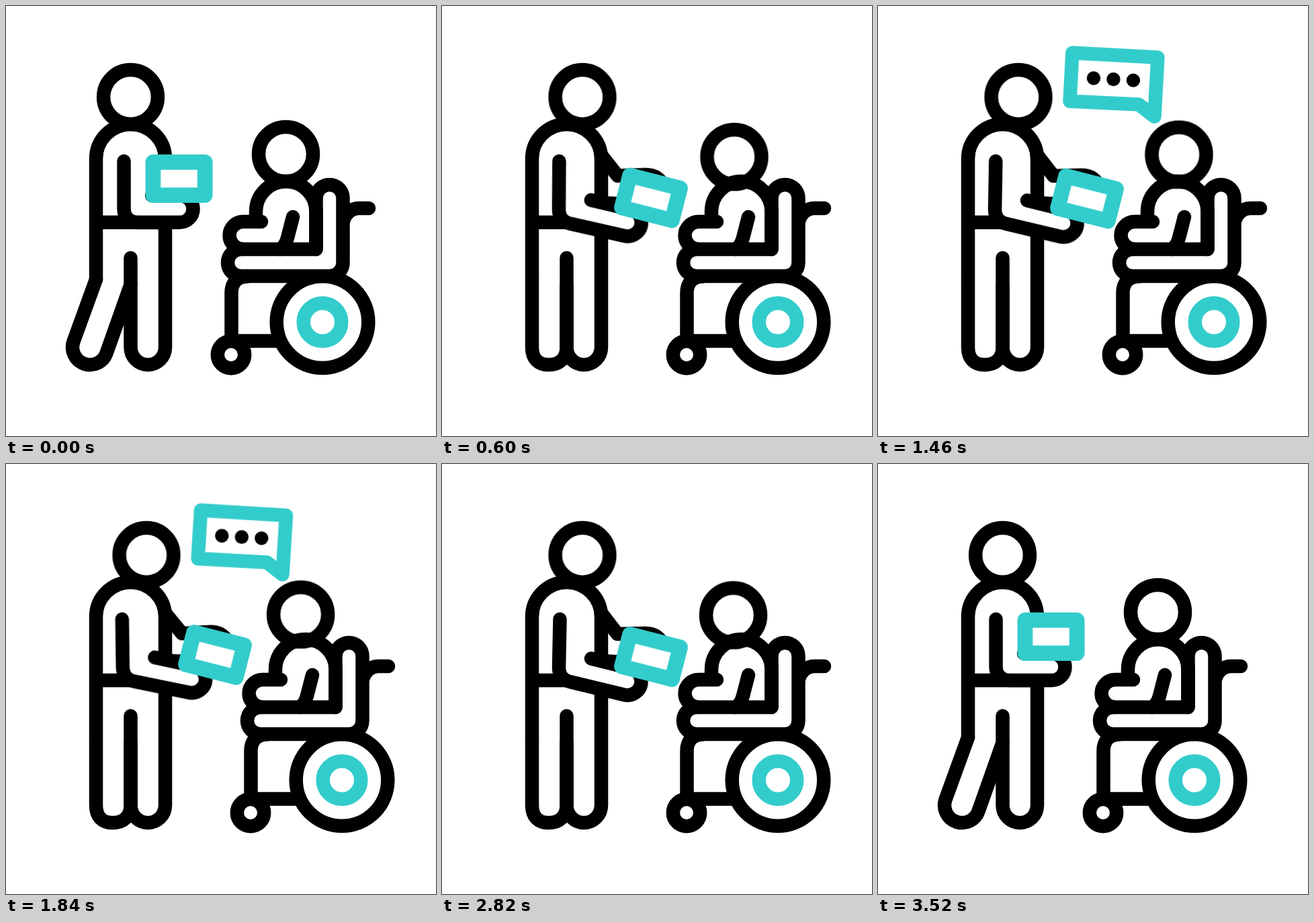
These frames come from a looping animation (640 by 640 pixels, 3600 ms). An HTML page:

```html
<!DOCTYPE html>
<html lang="en">
<head>
<meta charset="utf-8">
<title>Handing over a parcel</title>
<style>
html, body { margin: 0; width: 100%; height: 100%; overflow: hidden; background: #fff; }
svg { display: block; width: 100vw; height: 100vh; }
path, circle, rect { fill: none; stroke: #000; stroke-width: 20.5; stroke-linecap: round; stroke-linejoin: round; }
.teal { stroke: #33cccc; }
.solid { fill: #fff; }
.move { animation: 3600ms ease-in-out infinite; }

#helper-head { animation-name: lean; }
#back-leg { animation-name: step; }
#far-arm { animation-name: reach-far; }
#near-arm { animation-name: reach-near; }
#far-bob { animation-name: bob; transform-origin: 240px 225px; }
#near-bob { animation-name: bob; transform-origin: 175px 308px; }
#box-bob { animation-name: lift; }
#box { animation-name: hand-over; }
#chair { animation-name: roll; }
#sitter-head { animation-name: nod; }
#bubble { animation-name: talk; transform-origin: 411.5px 164.5px; }
#dots { animation-name: fade; }
#dots circle { fill: #000; stroke: none; }

/* Main pose: out 20-560 ms, back 2840-3400 ms */
@keyframes lean {
  0%, .56%, 94.44%, 100% { transform: none; }
  15.56%, 78.89% { transform: translateX(23.5px); }
}
@keyframes roll {
  0%, .56%, 94.44%, 100% { transform: none; }
  15.56%, 78.89% { transform: translateX(29px); }
}
@keyframes step {
  0%, .56%, 94.44%, 100% { d: path("M134 407 L100.5 499.3 C95.7 512.8 102.8 527.7 116.3 532.5 C129.8 537.3 144.7 530.2 149.5 516.7 L185.5 415"); }
  15.56%, 78.89% { d: path("M134 407 L134 508 C134 525 143 534 159 534 C175 534 185.5 524 185.5 508 L185.5 415"); }
}
@keyframes reach-near {
  0%, .56%, 94.44%, 100% { d: path("M175.5 231 L175.5 302 C175.5 314 183 322 196 322 L258 322 C270 322 278.5 313 278.5 302 C278.5 291 270 282 258 282 L217 282"); }
  15.56%, 78.89% { d: path("M175.5 231 L174 303 C174 315 180 321 190 324 L271 343.5 C284 346.5 297 337 296.5 323 C296 313 290 307 282 304.5 L222 289.5"); }
}
@keyframes reach-far {
  0%, .56%, 94.44%, 100% { d: path("M237 227 L237 240 L270 245 C280 245 285 250 285 255 M237 270 L270 270"); }
  15.56%, 78.89% { d: path("M238 223 L261 253 L303 252 C317 252 326 260 328 268 M237 293 L270 295"); }
}
@keyframes hand-over {
  0%, .56%, 94.44%, 100% { transform: translate(257.5px, 257px) rotate(0deg); }
  15.56%, 78.89% { transform: translate(311px, 287px) rotate(14.3deg); }
}

/* Small idle motion while the parcel is held out */
@keyframes bob {
  0%, 8%, 62.22%, 78.33%, 100% { transform: rotate(0deg); }
  16.67% { transform: rotate(-.8deg); }
  28.89% { transform: rotate(-2.6deg); }
  40.56% { transform: rotate(-.2deg); }
  52% { transform: rotate(-2deg); }
  71% { transform: rotate(-1.2deg); }
}
@keyframes lift {
  0%, 8%, 62.22%, 78.33%, 100% { transform: none; }
  16.67% { transform: translateY(-1.4px); }
  28.89% { transform: translateY(-4px); }
  40.56% { transform: translateY(-.4px); }
  52% { transform: translateY(-3px); }
  71% { transform: translateY(-2px); }
}
@keyframes nod {
  0%, .56%, 94.44%, 100% { transform: none; }
  16.67% { transform: translate(-10.5px, 4px); }
  28.89% { transform: translate(-12.5px, 5.5px); }
  40.56% { transform: translate(2.5px, .5px); }
  52% { transform: translate(-7px, 3.5px); }
  62.22% { transform: translate(-6px, 3.5px); }
  78.33% { transform: translate(-12px, 4.5px); }
}
@keyframes talk {
  0%, 17.5% { transform: rotate(-8deg) scale(0); }
  23.9% { transform: rotate(6.5deg) scale(1); }
  28.89% { transform: rotate(0deg) scale(1); }
  34.7% { transform: rotate(1.9deg) scale(1); }
  40.56% { transform: rotate(-.1deg) scale(1); }
  47% { transform: rotate(.9deg) scale(1); }
  54% { transform: rotate(0deg) scale(1); }
  62.22% { transform: rotate(2deg) scale(1); }
  64.5% { transform: rotate(2.4deg) scale(1); }
  71.5%, 100% { transform: rotate(-8deg) scale(0); }
}
@keyframes fade {
  0%, 28.33% { opacity: 0; animation-timing-function: linear; }
  38.5%, 52% { opacity: 1; animation-timing-function: linear; }
  60.5%, 100% { opacity: 0; }
}
</style>
</head>
<body>
<svg viewBox="0 0 640 640">
  <g id="chair" class="move">
    <circle id="sitter-head" class="move" cx="416.5" cy="220.5" r="40.5"/>
    <path d="M540 301 H525 C514 301 505 309 502 320"/>
    <path d="M372 316 V306 A44.75 45 0 0 1 461.5 306 V362"/>
    <path d="M427 314 L419 345 Q416 357 408 362"/>
    <path d="M380 321 H353 a20.5 20.5 0 0 0 0 41"/>
    <path d="M461.5 362 V286 a20 20 0 0 1 40 0 V382 a20 20 0 0 1 -20 20 H350 a20 20 0 0 1 0 -40 Z"/>
    <path d="M335.5 498.5 V427 C335.5 412 344 402.5 359 402.5 M335.5 498.5 H402"/>
    <circle class="solid" cx="335" cy="519" r="20.2"/>
    <circle class="solid" cx="471" cy="470.5" r="68.3"/>
    <circle class="teal" cx="471" cy="470.5" r="28.3"/>
  </g>

  <g id="bubble" class="move">
    <path class="teal" d="M289.5 69.5 L416.5 76.5 L411.5 164.5 L388 146.5 L285.5 141.5 Z"/>
    <g id="dots" class="move">
      <circle cx="321" cy="107.3" r="10.2"/>
      <circle cx="350.5" cy="109" r="10.2"/>
      <circle cx="380" cy="110.6" r="10.2"/>
    </g>
  </g>

  <g id="far-bob" class="move"><path id="far-arm" class="move" d="M237 227"/></g>
  <circle id="helper-head" class="move" cx="185.5" cy="135.5" r="40.4"/>
  <path id="back-leg" class="move" d="M134 407"/>
  <path d="M134 407 V227.5 A51.5 51.5 0 0 1 237 227.5 V508 A25.75 26 0 0 1 185.5 508 V375 M134 322 H237"/>
  <g id="near-bob" class="move"><path id="near-arm" class="move solid" d="M175.5 231"/></g>
  <g id="box-bob" class="move">
    <g id="box" class="move">
      <rect class="teal solid" x="-38.6" y="-24.6" width="77.2" height="49.2" style="stroke-width:22.8"/>
    </g>
  </g>
</svg>
</body>
</html>
```
